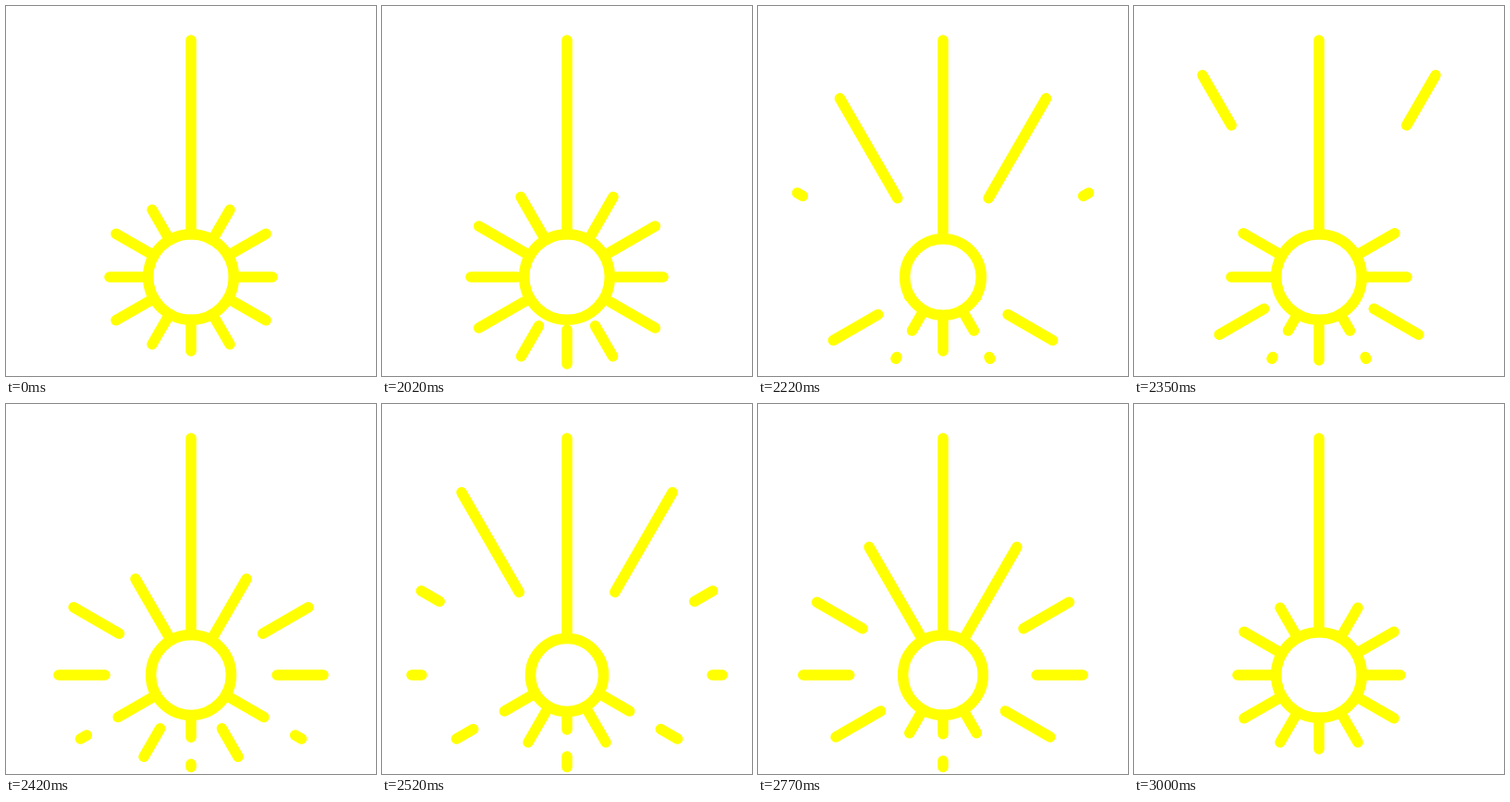
An HTML page for the animation above (3.02 s loop, 400 by 400 pixels).

```html
<!DOCTYPE html>
<html lang="en">
<head>
<meta charset="utf-8">
<title>Beam and sparks</title>
<style>
  html, body { margin: 0; width: 100%; height: 100%; overflow: hidden; background: #fff; }
  svg { display: block; width: 100vw; height: 100vh; }
  path, circle { fill: none; stroke: #ff0; stroke-width: 11.5; stroke-linecap: round; }
</style>
</head>
<body>
<svg viewBox="0 0 400 400">
  <path id="rays"/>
  <path id="beam"/>
  <circle id="ring" cx="200" cy="293"/>
</svg>
<script>
const LOOP = 3020, REST = 2020, STEPS = 40;
const CX = 200, CY = 293;

// Dashes run outwards along each ray; heads are travelled distances at the key steps.
const keys = [0, 1, 9, 14, 21, 25, 40];
const radius = [46.3, 46.3, 41.3, 46.3, 39.5, 41.3, 46.3];
const rays = [
  { angle: -60, end: 252, dash: 124.5, period: 275, heads: [84, 100, 223, 314, 503, 577, 909] },
  { angle: -30, end: 182, dash: 57, period: 240, heads: [93.6, 110, 232, 334.5, 456, 520, 813.6] },
  { angle: 0, end: 168, dash: 50, period: 230, heads: [88, 104, 232, 325, 437, 500, 778] },
  { angle: 30, end: 138, dash: 56, period: 95, heads: [93.6, 110, 232, 314.5, 458, 509, 758.6] },
  { angle: 60, end: 102, dash: 38, period: 71, heads: [84, 99, 209, 280, 368, 396, 652] },
  { angle: 90, end: 99.5, dash: 37, period: 66, heads: [80, 94, 212, 288, 389, 427, 674] }
];

const byId = id => document.getElementById(id);
const [rayPath, beam, ring] = ["rays", "beam", "ring"].map(byId);

// The motion advances every 25 ms, rounded to tens: 30, 20, 30, 20 ...
function stepAt(t) {
  const s = t - REST;
  if (s < 0) return 0;
  const k = 2 * Math.floor(s / 50) + (s % 50 >= 30 ? 1 : 0);
  return (k + 1) % STEPS;
}

function valueAt(values, step) {
  let i = 1;
  while (keys[i] < step) i++;
  const p = (step - keys[i - 1]) / (keys[i] - keys[i - 1]);
  return values[i - 1] + (values[i] - values[i - 1]) * p;
}

function segment(angle, from, to) {
  const a = angle * Math.PI / 180;
  const point = r => `${(CX + r * Math.cos(a)).toFixed(2)} ${(CY + r * Math.sin(a)).toFixed(2)}`;
  return `M${point(from)}L${point(to)}`;
}

function rayShape(ray, step, inner) {
  let d = "";
  for (let head = valueAt(ray.heads, step); head > inner; head -= ray.period) {
    const from = Math.max(inner, head - ray.dash);
    const to = Math.min(ray.end, head);
    if (from > to) continue;
    d += segment(ray.angle, from, to);
    if (ray.angle < 90) d += segment(180 - ray.angle, from, to);
  }
  return d;
}

function draw() {
  const step = stepAt(performance.now() % LOOP);
  const r = valueAt(radius, step);
  ring.setAttribute("r", r);
  beam.setAttribute("d", `M${CX} 37V${CY - r}`);
  rayPath.setAttribute("d", rays.map(ray => rayShape(ray, step, r)).join(""));
  requestAnimationFrame(draw);
}
draw();
</script>
</body>
</html>
```
